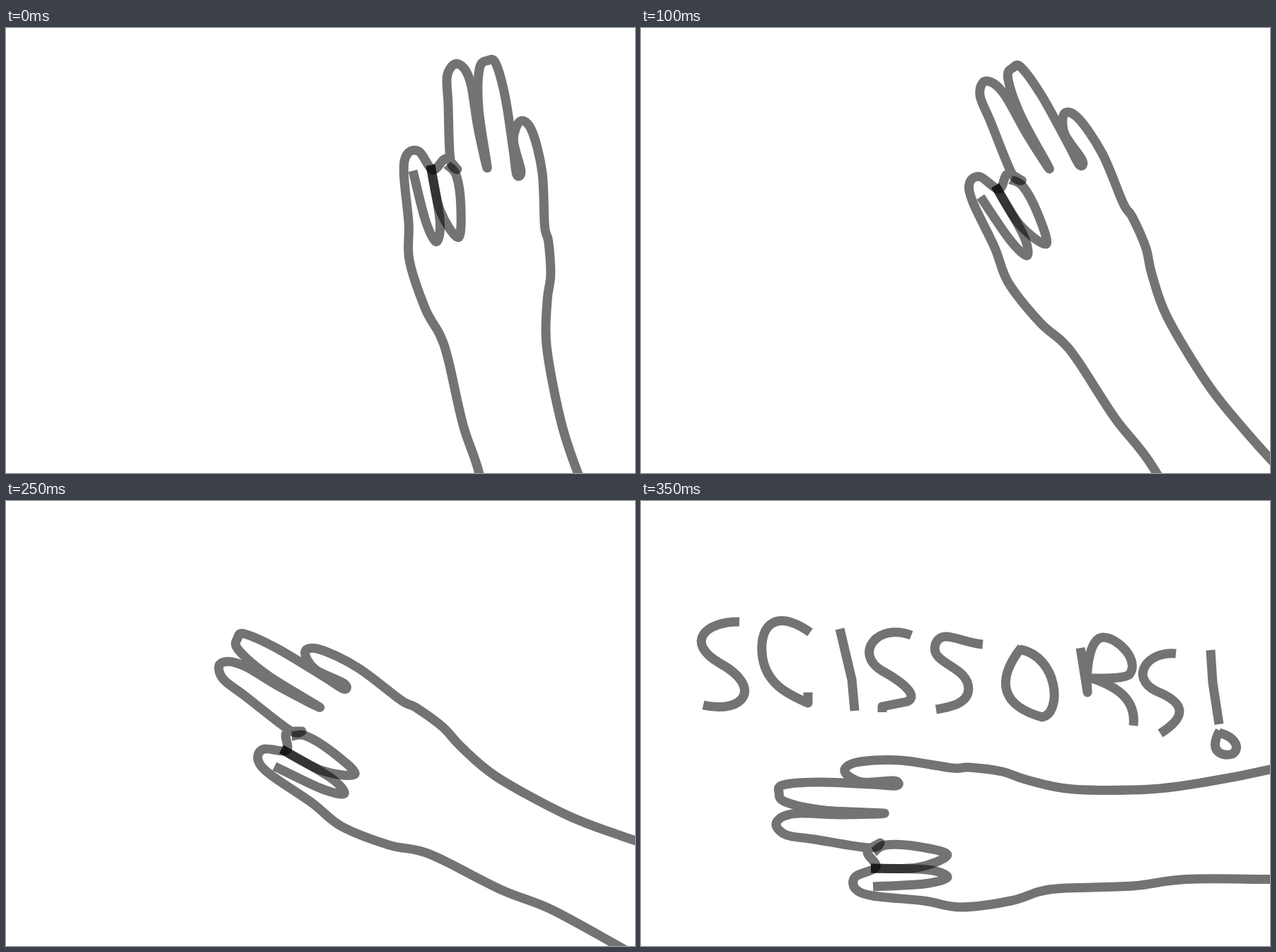
Animation, 889 px wide and 630 px high, one loop 0.4 s. Source, as an HTML page with a canvas:

```html
<!DOCTYPE html>
<html lang="en">
<head>
<meta charset="utf-8">
<title>Scissors</title>
<style>
  html, body { margin: 0; height: 100%; overflow: hidden; background: #fff; }
  canvas { display: block; }
</style>
</head>
<body>
<canvas id="stage" width="889" height="630"></canvas>
<script>
const ctx = document.getElementById('stage').getContext('2d');
const STEP = 50, STEPS = 8;

// Smooth curve through a few "x,y" key points (Catmull-Rom).
function curve(text) {
  const pts = text.split(' ').map(p => p.split(',').map(Number));
  const at = i => pts[Math.max(0, Math.min(pts.length - 1, i))];
  const path = new Path2D();
  path.moveTo(...pts[0]);
  for (let i = 0; i < pts.length - 1; i++) {
    const [a, b, c, d] = [at(i - 1), at(i), at(i + 1), at(i + 2)];
    path.bezierCurveTo(
      b[0] + (c[0] - a[0]) / 6, b[1] + (c[1] - a[1]) / 6,
      c[0] - (d[0] - b[0]) / 6, c[1] - (d[1] - b[1]) / 6, c[0], c[1]);
  }
  return path;
}

// The resting hand points left; it turns about the gap between the long fingers.
const PIVOT = { x: 344, y: 442 };
const upperArm = '960,361 889,380 803,397 720,408 610,408 546,395 510,383 463,377 440,378';
const thumb = '365,367 305,370 288,383 312,398 357,396 361,403 325,401';
const middleFinger = '250,398 201,402 195,412 204,426 260,438 344,442';
const indexFinger = '285,444 225,442 200,447 191,459 206,473 245,479 322,491';
const curledTips = '338,484 320,497 332,518 303,532 303,549 328,559';
const lowerArm = '400,566 452,575 523,566 563,553 600,548 695,545 770,535.5 889,535.5 960,535.5';

const hand = [
  [upperArm, thumb, middleFinger, indexFinger, curledTips, lowerArm].join(' '),
  '325,520 390,519 433,501 390,489 346,487 329,497',
  '328,546 400,542 433,533 405,522 325,520'
].map(curve);

const lettering = new Path2D([
  'M139,171 C92,170 60,200 112,230 C172,263 147,302 88,289',
  'M239,186 C190,152 168,176 171,215 C174,258 208,274 236,286 V271',
  'M281,181 L298,253 302,297',
  'M382,190 C335,172 300,215 340,240 C380,262 390,278 376,284 L341,291 V299',
  'M483,203 C450,200 425,180 416,203 C408,232 462,232 463,266 C462,288 435,292 417,295',
  'M538,207 C500,255 510,290 567,306 C596,300 590,220 535,210',
  'M621,208 L631,271 C628,228 637,193 653,193 C674,193 706,226 690,246 C680,252 655,251 638,251 C672,263 700,280 696,318',
  'M756,216 C715,212 690,250 728,269 C770,286 772,305 734,329',
  'M805,211 L808,257 817,316',
  'M818,325 C800,358 825,362 836,358 C848,350 840,334 817,328'
].join(' '));

const radians = degrees => degrees * Math.PI / 180;
const mix = (a, b, u) => a + (b - a) * u;
const turnAt = beat => Math.max(0, 79 - 10.05 * beat);

// Four beats swing about the elbow, four more glide to rest; one beat is skipped.
function pose(step) {
  const beat = step > 5 ? step + 1 : step;
  const swing = radians(turnAt(Math.min(beat, 4)) - 69.6);
  const u = Math.max(0, beat - 4) / 4;
  const glide = u + u * u * (1 - u) / 2;
  return {
    x: mix(632 + 295 * Math.sin(swing), PIVOT.x, glide),
    y: mix(489 - 295 * Math.cos(swing), PIVOT.y, glide),
    turn: radians(turnAt(beat))
  };
}

function draw(time) {
  const step = Math.floor(time / STEP) % STEPS;
  const { x, y, turn } = pose(step);
  ctx.clearRect(0, 0, 889, 630);
  ctx.strokeStyle = 'rgba(0, 0, 0, 0.55)';
  ctx.lineWidth = 13;
  ctx.lineJoin = 'round';
  ctx.save();
  ctx.translate(x, y);
  ctx.rotate(turn);
  ctx.translate(-PIVOT.x, -PIVOT.y);
  hand.forEach(path => ctx.stroke(path));
  ctx.restore();
  if (step === STEPS - 1) ctx.stroke(lettering);
}

const start = performance.now();
function tick() {
  draw(performance.now() - start);
  requestAnimationFrame(tick);
}
tick();
</script>
</body>
</html>
```
